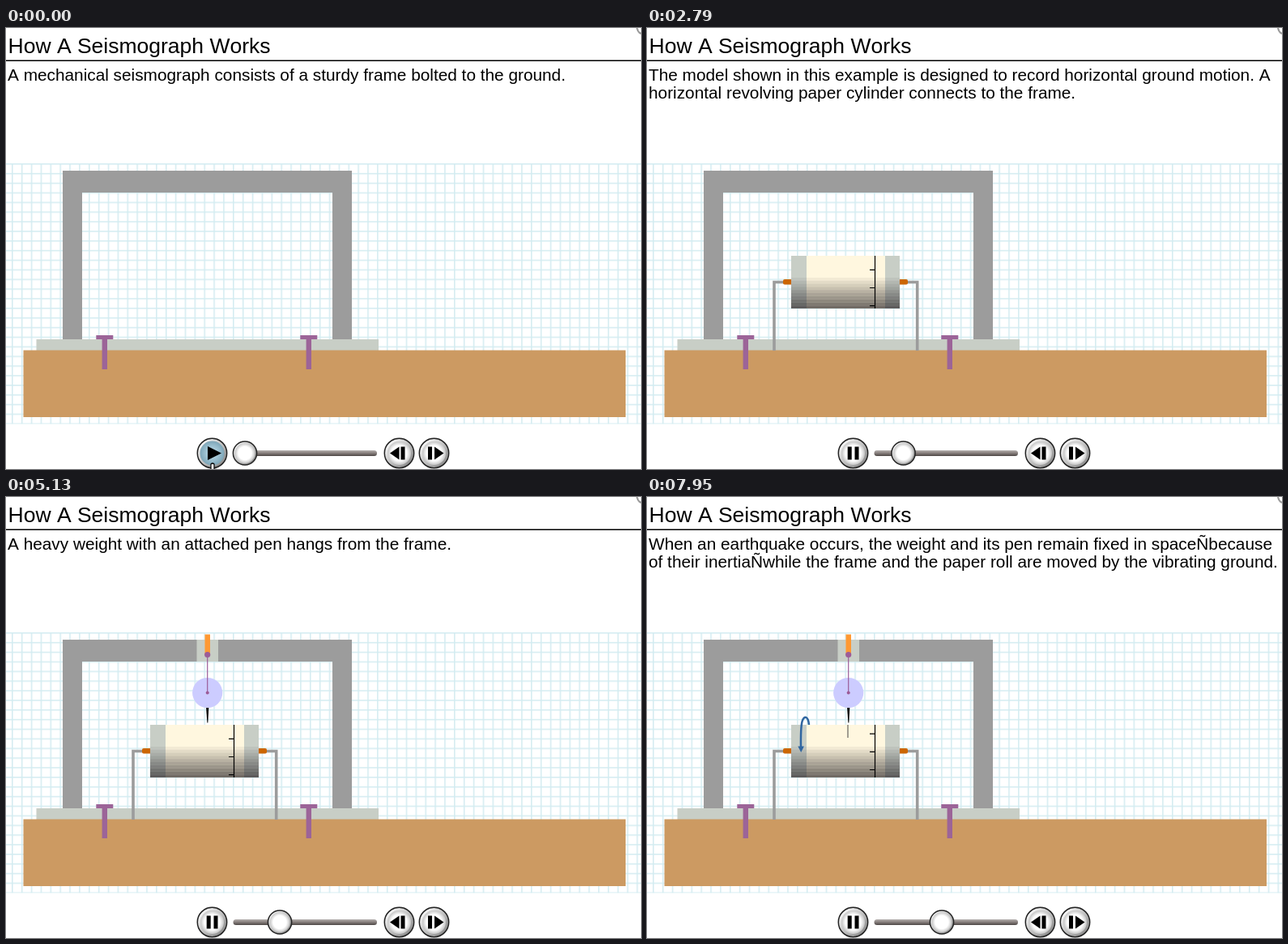
Animation, 784 px wide and 544 px high, one loop 8 s. Source, as an HTML page:

```html
<!DOCTYPE html>
<html lang="en">
<head>
<meta charset="utf-8">
<title>How A Seismograph Works</title>
<style>
  html, body { margin: 0; width: 100%; height: 100%; overflow: hidden; background: #fff; }
  svg { display: block; width: 784px; height: 544px; }
  text { font-family: "Liberation Sans", Arial, sans-serif; font-size: 20.8px; font-kerning: none; }
</style>
</head>
<body>
<svg viewBox="0 0 784 544">
  <defs>
    <pattern id="grid" x="7" y="167" width="11.87" height="11.87" patternUnits="userSpaceOnUse">
      <path d="M0 .8H12M.8 0V12" stroke="#d3ecf1" stroke-width="1.5"/>
    </pattern>
    <linearGradient id="rim" x1="0" y1="0" x2="1" y2="1">
      <stop offset=".1" stop-color="#fff"/><stop offset=".55" stop-color="#bbb"/><stop offset="1" stop-color="#777"/>
    </linearGradient>
    <radialGradient id="face">
      <stop offset=".65" stop-color="#fff"/><stop offset="1" stop-color="#c4c4c4"/>
    </radialGradient>
    <radialGradient id="hover">
      <stop offset=".4" stop-color="#a9cbda"/><stop offset="1" stop-color="#7da6b8"/>
    </radialGradient>
    <linearGradient id="track" x1="0" y1="0" x2="0" y2="1">
      <stop offset="0" stop-color="#b5b0ae"/><stop offset=".5" stop-color="#857d7b"/><stop offset="1" stop-color="#4c4644"/>
    </linearGradient>
    <g id="button">
      <circle r="18.2" fill="url(#rim)" stroke="#222" stroke-width="1.5"/>
      <circle r="14.5" fill="url(#face)"/>
    </g>
    <path id="bolt" d="M-10.5 379h21v5h-7.3v37h-6.4v-37h-7.3z" fill="#9c6498"/>
    <clipPath id="drumClip"><rect x="178" y="281" width="134" height="65"/></clipPath>
  </defs>

  <text x="2.5" y="30.5" style="font-size:26.5px">How A Seismograph Works</text>
  <rect y="39.5" width="784" height="1.5"/>
  <path d="M779 0Q780 5 784 7" fill="none" stroke="#999" stroke-width="2"/>
  <text id="line1" x="2" y="65"/>
  <text id="line2" x="2" y="87"/>

  <rect y="167" width="784" height="321.5" fill="url(#grid)"/>
  <path d="M70 384V176H427V384H403V203H94V384z" fill="#9c9c9c"/>
  <rect x="37.5" y="384" width="422.5" height="14" fill="#c8cec6"/>
  <rect x="21.5" y="397.5" width="743.5" height="82.5" fill="#cc9a62"/>
  <use href="#bolt" x="121.8"/>
  <use href="#bolt" x="373.8"/>

  <g id="drum">
    <path d="M169 313.5H157V398M321 313.5H333.7V398" fill="none" stroke="#9c9c9c" stroke-width="3.6"/>
    <rect x="168" y="310" width="154" height="6.5" rx="2" fill="#cc6600"/>
    <rect x="178" y="281" width="134" height="65" fill="#c8cec6"/>
    <rect x="197" y="281" width="97" height="65" fill="#fff7df"/>
    <g id="shade"/>
    <g clip-path="url(#drumClip)">
      <path id="ticks" fill="none" stroke="#000" stroke-width="1.2"/>
      <path id="trace" fill="none" stroke="#444" stroke-width="1"/>
    </g>
  </g>

  <g id="weight">
    <rect x="235.5" y="176" width="26.5" height="27" fill="#c8cec6"/>
    <rect x="245.5" y="169.5" width="6.5" height="25" fill="#ff9933"/>
    <circle cx="248.7" cy="241.5" r="18.6" fill="#ccccff"/>
    <g fill="#9c5c98">
      <circle cx="248.7" cy="194.5" r="3.6"/>
      <circle cx="248.7" cy="241.5" r="2"/>
      <rect x="248.1" y="194" width="1.2" height="47"/>
    </g>
    <path d="M247.1 260h3.2l-1 18.5h-.9z"/>
  </g>

  <g id="turn">
    <path d="M200 281C199 270 194 269 191.5 277C190 283 189.8 295 190 309" fill="none" stroke="#2f65a0" stroke-width="2.5"/>
    <path d="M186.3 307.5h7.6l-3.7 7.5z" fill="#2f65a0"/>
  </g>

  <rect x="280.5" y="521" width="177.5" height="7" rx="3.5" fill="url(#track)"/>
  <g id="knob">
    <circle r="14.6" fill="url(#rim)" stroke="#222" stroke-width="1.5"/>
    <circle r="12.5" fill="url(#face)"/>
  </g>

  <use href="#button" x="254.5" y="524.5"/>
  <use href="#button" x="485.5" y="524.5"/>
  <use href="#button" x="528.5" y="524.5"/>
  <path d="M474 524.5l11.5-8v16zM487.5 516.5h5v16h-5z"/>
  <path d="M540.5 524.5l-11.5-8v16zM521 516.5h5v16h-5z"/>
  <g id="play">
    <circle cx="254.5" cy="524.5" r="15" fill="url(#hover)"/>
    <path d="M249 516l17 8.5l-17 8.5z"/>
    <path id="hand" d="M-2 1Q0-1 2 1V7L8 8L11 10V16L8 22H-3L-8 13Q-7 10-2 14z" fill="#fff" stroke="#000" stroke-width="1.2"/>
  </g>
  <path id="pause" d="M247.7 516.5h5v16h-5zM256.5 516.5h5v16h-5z"/>
</svg>
<script>
const LOOP = 8000, STEP = 60, START = 450, SCENE = 3600;
const TICK_GAP = 22.2, ROLL_PER_STEP = 3.2, KNOB_SPEED = 0.0092;
const captions = [
  ["A mechanical seismograph consists of a sturdy frame bolted to the ground."],
  ["The model shown in this example is designed to record horizontal ground motion. A",
   "horizontal revolving paper cylinder connects to the frame."],
  ["A heavy weight with an attached pen hangs from the frame."],
  ["When an earthquake occurs, the weight and its pen remain fixed in spaceÑbecause",
   "of their inertiaÑwhile the frame and the paper roll are moved by the vibrating ground."]
];
const el = id => document.getElementById(id);
const show = (id, on) => { el(id).style.display = on ? "" : "none"; };

// Banded shadow on the lower half of the drum
const BANDS = 10, bandHeight = 38 / BANDS;
el("shade").innerHTML = Array.from({ length: BANDS }, (_, i) =>
  `<rect x="178" y="${308 + i * bandHeight}" width="134" height="${bandHeight}" fill="#201c20" opacity="${0.06 + 0.064 * i}"/>`
).join("");

function handPosition(t) {
  const moves = (t >= 60) + (t >= 120) + (t >= 250);
  return `translate(${255 + moves * 0.6} ${537 - moves * 2.8})`;
}

function render(t) {
  const playing = t >= START;
  const elapsed = playing ? Math.floor((t - START) / STEP) * STEP : 0;
  const scene = playing ? 1 + Math.floor(elapsed / SCENE) : 0;

  el("line1").textContent = captions[scene][0];
  el("line2").textContent = captions[scene][1] || "";
  show("drum", scene >= 1);
  show("weight", scene >= 2);
  show("turn", scene >= 3);
  show("play", !playing);
  show("pause", playing);
  el("hand").setAttribute("transform", handPosition(t));
  el("knob").setAttribute("transform", `translate(${295 + elapsed * KNOB_SPEED} 524.5)`);

  const roll = scene === 3 ? (elapsed - 2 * SCENE) / STEP * ROLL_PER_STEP : 0;
  let ticks = "M281.5 281V346";
  for (let y = 298.3 + roll - TICK_GAP; y < 346; y += TICK_GAP) ticks += `M275 ${y}H281.5`;
  el("ticks").setAttribute("d", ticks);
  el("trace").setAttribute("d", `M248 281v${roll}`);
}

const begin = performance.now();
function frame() {
  render((performance.now() - begin) % LOOP);
  requestAnimationFrame(frame);
}
frame();
</script>
</body>
</html>
```
